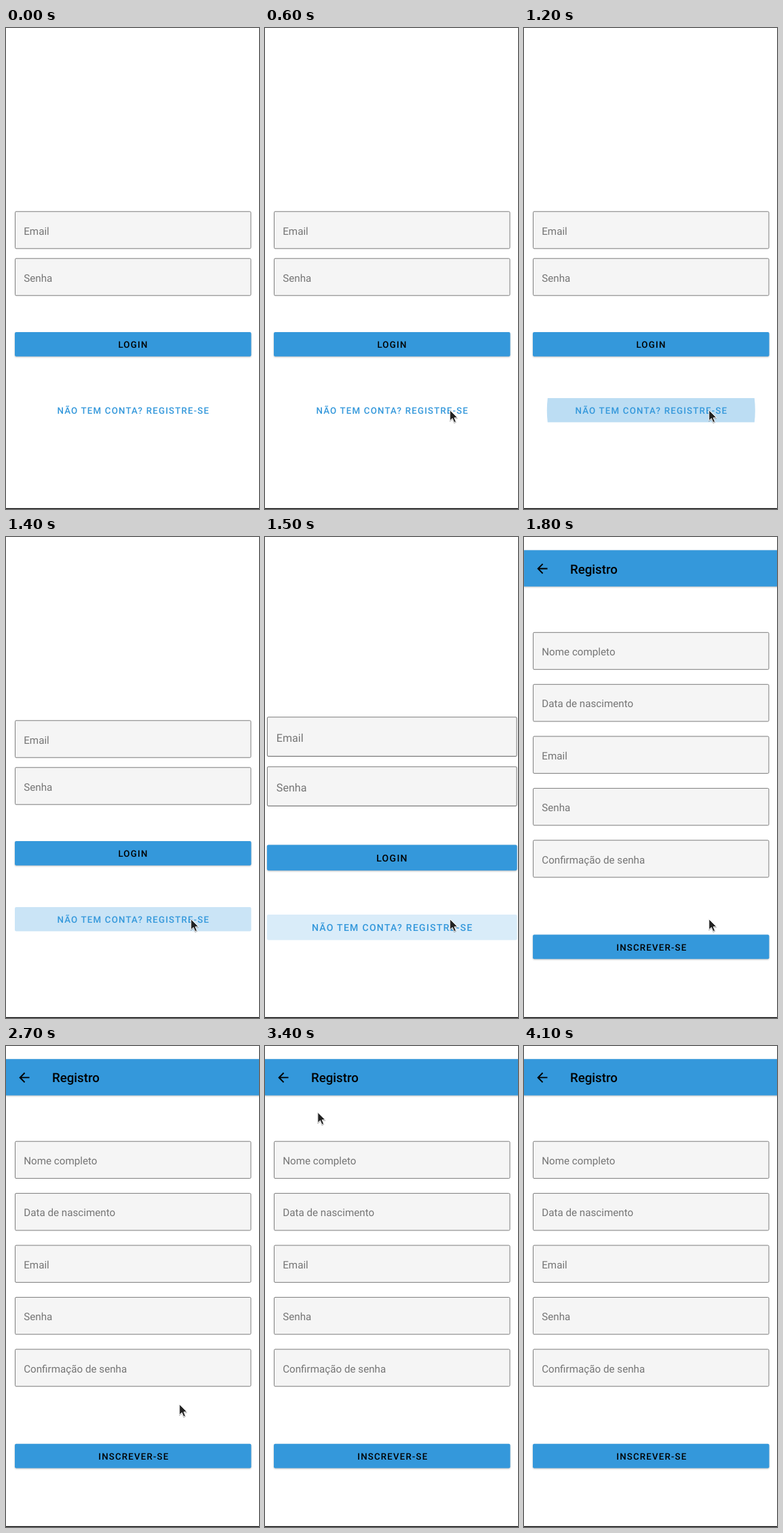
An HTML page for the animation above (4.9 s loop, 373 by 707 pixels).

```html
<!DOCTYPE html>
<html lang="pt">
<head>
<meta charset="utf-8">
<style>
html, body { margin: 0; width: 100%; height: 100%; overflow: hidden; background: #fff; }
svg { display: block; width: 373px; height: 707px; font-family: Roboto, sans-serif; text-rendering: geometricPrecision; }
.field { fill: #f5f5f5; stroke: #7c7c7c; }
.hint { font-size: 15.2px; fill: #757575; }
.label { font-size: 13.3px; font-weight: 500; letter-spacing: 1.19px; }
.title { font-size: 18.7px; font-weight: 500; }
.blue { fill: #3498db; }
.raised { filter: drop-shadow(0 1px 1px rgba(0, 0, 0, .25)); }
#cursor { fill: #222; stroke: #fff; filter: drop-shadow(.5px 1px .7px rgba(0, 0, 0, .35)); }
</style>
</head>
<body>
<svg viewBox="0 0 373 707">
  <defs>
    <clipPath id="linkBox"><rect x="13" y="544" width="348.5" height="35.5" rx="2"/></clipPath>
  </defs>
  <g id="login">
    <g clip-path="url(#linkBox)"><circle id="ripple" class="blue" cx="187.3" cy="562"/></g>
    <text class="label blue" x="75.4" y="567.2">NÃO TEM CONTA? REGISTRE-SE</text>
  </g>
  <g id="register">
    <rect class="blue raised" y="19.2" width="380" height="53.4"/>
    <path d="M20 11H7.83l5.59-5.59L12 4l-8 8 8 8 1.41-1.41L7.83 13H20z" transform="translate(15.5 35) scale(.95)"/>
    <text class="title" x="68" y="53.4">Registro</text>
  </g>
  <rect y="705.8" width="373" height="1.2"/>
  <path id="cursor" d="M.7.6V16.2L4.3 12.9 6.8 18.8 9.6 17.6 7.1 11.9H12z"/>
</svg>
<script>
const LOOP = 4900, STEP = 100;
const PRESS = 1200, LEAVE = 1400, ENTER = 1600;
const CX = 187, CY = 356;
const $ = id => document.getElementById(id);
const login = $('login'), register = $('register'), ripple = $('ripple'), cursor = $('cursor');

function add(parent, tag, attrs, text = '') {
  const el = document.createElementNS('http://www.w3.org/2000/svg', tag);
  for (const key in attrs) el.setAttribute(key, attrs[key]);
  el.textContent = text;
  parent.append(el);
}

function field(page, y, hint) {
  add(page, 'rect', { class: 'field', x: 13.5, y, width: 347.5, height: 54.4, rx: 1.5 });
  add(page, 'text', { class: 'hint', x: 26.2, y: y + 33.8 }, hint);
}

function button(page, y, x, label) {
  add(page, 'rect', { class: 'blue raised', x: 13, y, width: 348.5, height: 35.7, rx: 2 });
  add(page, 'text', { class: 'label', x, y: y + 23.2 }, label);
}

['Email', 'Senha'].forEach((hint, i) => field(login, 269.8 + 69 * i, hint));
button(login, 447.1, 165.4, 'LOGIN');
['Nome completo', 'Data de nascimento', 'Email', 'Senha', 'Confirmação de senha']
  .forEach((hint, i) => field(register, 140.2 + 76.4 * i, hint));
button(register, 584.7, 136.2, 'INSCREVER-SE');

const clamp = v => Math.min(1, Math.max(0, v));
const easeOut = p => 1 - (1 - p) ** 2;
const linear = p => p;

// Each stroke: start, end, from, to, easing
const strokes = [
  [300, 600, [308, 549], [272, 561], easeOut],
  [2600, 2700, [272, 561], [255, 526], linear],
  [2700, 3200, [255, 526], [131, 194], linear],
  [3200, 3800, [131, 194], [34, 19], easeOut],
  [3800, 4000, [34, 19], [31, -3], linear]
];

function movePointer(t) {
  const visible = t >= 300 && t < 4100;
  cursor.style.display = visible ? '' : 'none';
  if (!visible) return;
  const [start, end, from, to, ease] = strokes.findLast(s => s[0] <= t);
  const p = ease(clamp((t - start) / (end - start)));
  const [x, y] = from.map((v, i) => v + (to[i] - v) * p);
  cursor.setAttribute('transform', `translate(${x} ${y})`);
}

function spreadRipple(t) {
  const fade = clamp((t - PRESS - STEP) / 200);
  ripple.setAttribute('r', t < PRESS ? 0 : 153.5 + 0.4 * (t - PRESS));
  ripple.setAttribute('fill-opacity', 0.33 - 0.145 * fade);
}

function showPage(t) {
  const entered = t >= ENTER;
  const scale = entered
    ? 1 - 0.0075 * 0.25 ** ((t - ENTER) / STEP)
    : 1 + 0.058 * clamp((t - LEAVE) / STEP);
  const page = entered ? register : login;
  login.style.display = entered ? 'none' : '';
  register.style.display = entered ? '' : 'none';
  page.setAttribute('transform',
    `translate(${CX * (1 - scale)} ${CY * (1 - scale)}) scale(${scale})`);
}

function draw(time) {
  const t = Math.floor(time / STEP) * STEP;
  movePointer(t);
  spreadRipple(t);
  showPage(t);
}

const start = performance.now();
function tick(now) {
  draw(Math.max(0, now - start) % LOOP);
  requestAnimationFrame(tick);
}
draw(0);
requestAnimationFrame(tick);
</script>
</body>
</html>
```
